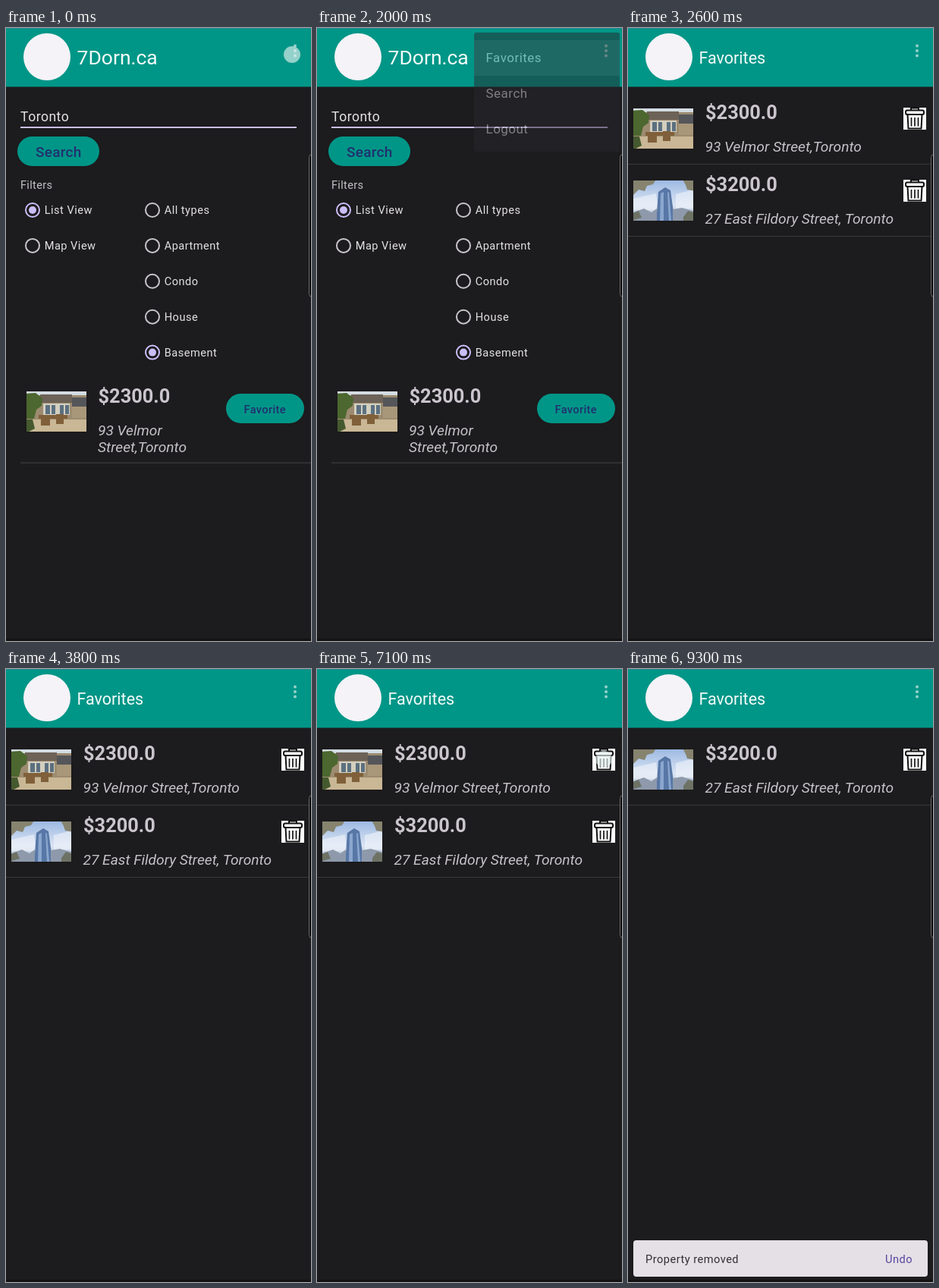
These frames come from a looping animation (402 by 808 pixels, 9800 ms). An HTML page:

```html
<!DOCTYPE html>
<html lang="en">
<head>
<meta charset="utf-8">
<title>Rental search</title>
<style>
  html, body { margin: 0; height: 100%; overflow: hidden; background: #1c1b1d; }
  svg { display: block; width: 402px; height: 808px; }
  text { font: 14.6px Roboto, sans-serif; letter-spacing: .48px; fill: #e4e1e5; }
  .brand { font-size: 26.5px; letter-spacing: 0; fill: #f4fbfa; }
  .title { font-size: 21.5px; letter-spacing: 0; fill: #f4fbfa; }
  .field { font-size: 17.6px; }
  .menu { font-size: 17px; }
  .price { font-size: 25.4px; font-weight: 700; letter-spacing: 0; fill: #cac5cd; }
  .address { font-size: 19.2px; font-style: italic; letter-spacing: 0; fill: #c6c2c8; }
  .button { font-weight: 500; letter-spacing: .35px; fill: #20306f; }
  .big { font-size: 19px; letter-spacing: .25px; }
  .radio { fill: none; stroke: #c9c5cb; stroke-width: 2; }
  .radio.on { stroke: #cbbef8; }
</style>
</head>
<body>
<svg viewBox="0 0 402 808">
  <defs>
    <linearGradient id="sky" x2="0" y2="1">
      <stop stop-color="#9db9e2"/><stop offset=".6" stop-color="#d9e4f3"/><stop offset="1" stop-color="#b4c1d4"/>
    </linearGradient>
    <filter id="soft"><feGaussianBlur stdDeviation=".7"/></filter>
    <clipPath id="photoClip"><path d="M0 0h79v53H0z"/></clipPath>
    <clipPath id="menuClip"><rect id="reveal"/></clipPath>

    <g id="house" clip-path="url(#photoClip)">
      <path fill="#9c8b70" d="M0 0h79v53H0z"/>
      <g filter="url(#soft)">
        <path fill="#d3dce2" d="M-3-3h85v8H-3z"/>
        <path fill="#6d6257" d="M18 4h42v11H18z"/>
        <path fill="#55565a" d="M60 8h22v13H60z"/>
        <path fill="#a89779" d="M60 20h22v15H60z"/>
        <path fill="#d3cfbf" d="M22 16h35v15H22z"/>
        <path fill="#5c7080" d="M25 18h6v12h-6zm8 0h5v12h-5zm11 0h5v12h-5zm7 0h5v12h-5z"/>
        <path fill="#c9b795" d="M-3 37h85v19H-3z"/>
        <path fill="#80603a" d="M16 31h38v5H16zm3 5h12v9H19zm20-6h10v13H39z"/>
        <path fill="#4c672f" d="M-3 3l15-1 9 7-1 10-7 5-3 12H-3z"/>
        <path fill="#45592f" d="M-3 37H8l3 12-14 7z"/>
      </g>
    </g>

    <g id="tower" clip-path="url(#photoClip)">
      <path fill="url(#sky)" d="M0 0h79v53H0z"/>
      <g filter="url(#soft)">
        <path fill="#f0f4fa" opacity=".6" d="M0 24l30-7 2 22H0zm56-6l23-6v25H56z"/>
        <path fill="#5877a6" d="M33 15l9-6 7 4 6 43H30z"/>
        <path fill="#8ba7cf" d="M36 17l4-2v38h-5zm9-2l2 1 3 37h-3z"/>
        <path fill="#8e9aab" d="M-3 43l17-6 10 5 7-5v19H-3zm55-5l12-2 18 5v15H52z"/>
        <path fill="#86846f" d="M-3-3h34l-5 8-8 2-3 7-8-2-7 7-3 1zm67 0h18v17l-11-2-2-6z"/>
        <path fill="#6d7264" d="M-3 44l10-4 4 9-14 4zm69 4l6-8 10 3v13H66z"/>
      </g>
    </g>

    <g id="trash">
      <path fill="#fff" d="M363 105h30v29h-30z"/>
      <g fill="#fff" stroke="#111" stroke-width="2">
        <path d="M373 109v-3.500h10v3.500M368.500 114l1 18.500h17l1-18.500z"/>
        <rect x="366" y="108.500" width="24" height="5.500" rx="2"/>
        <path d="M373.500 118v11.500M378 118v11.500M382.500 118v11.500" stroke-width="1.700"/>
      </g>
    </g>

    <g id="header">
      <path fill="#009687" d="M0 0h402v77.500H0z"/>
      <path fill="#2b8593" d="M0 0h402v1H0z"/>
      <circle cx="54" cy="38" r="31" fill="#f5f3f7"/>
      <g fill="#94d2ca">
        <circle cx="381" cy="23.500" r="2"/><circle cx="381" cy="30" r="2"/><circle cx="381" cy="36.500" r="2"/>
      </g>
    </g>
  </defs>

  <path fill="#1c1b1d" d="M0 0h402v808H0z"/>

  <g id="searchPage">
    <use href="#header"/>
    <text class="brand" x="93.500" y="48">7Dorn.ca</text>
    <text class="field" x="19" y="122.500">Toronto</text>
    <path id="caret" fill="#d3c8f5" d="M85.500 103h1.500v25h-1.500z"/>
    <path fill="#cbbdf0" d="M19 130h364v2H19z"/>
    <rect x="15" y="143" width="108" height="39" rx="19.500" fill="#009687"/>
    <text class="button big" x="39" y="170">Search</text>
    <text x="19" y="212" style="fill:#c5c1c7;letter-spacing:.3px">Filters</text>
    <g id="options"></g>
    <use href="#house" x="27" y="479"/>
    <text class="price" x="121.500" y="494">$2300.0</text>
    <text class="address" x="121" y="537">93 Velmor</text>
    <text class="address" x="121" y="559">Street,Toronto</text>
    <rect x="290" y="482" width="103" height="39" rx="19.500" fill="#009687"/>
    <text class="button" x="313.500" y="507.500">Favorite</text>
    <path fill="#3d3c3f" d="M19 572.500h383v1.200H19z"/>
  </g>

  <g id="menu" clip-path="url(#menuClip)">
    <rect x="207" y="6" width="192" height="157" rx="3" fill="#29282e"/>
    <path id="pressed" fill="#fff" opacity=".1" d="M207 16h192v47H207z"/>
    <text class="menu" x="222.500" y="45">Favorites</text>
    <text class="menu" x="222.500" y="92">Search</text>
    <text class="menu" x="222.500" y="139">Logout</text>
  </g>

  <g id="favoritesPage">
    <path fill="#cbbbfb" d="M0-30h402V0H0z"/>
    <path fill="#1c1b1d" d="M0 0h402v808H0z"/>
    <use href="#header"/>
    <text class="title" x="93.500" y="46.500">Favorites</text>
    <g id="first">
      <use href="#house" x="7" y="106"/>
      <text class="price" x="102" y="120">$2300.0</text>
      <text class="address" x="101.500" y="163">93 Velmor Street,Toronto</text>
      <use href="#trash"/>
      <path fill="#39383b" d="M0 179h402v1H0z"/>
    </g>
    <g id="second">
      <use href="#tower" x="7" y="106"/>
      <text class="price" x="102" y="120">$3200.0</text>
      <text class="address" x="101.500" y="163">27 East Fildory Street, Toronto</text>
      <use href="#trash"/>
      <path fill="#39383b" d="M0 179h402v1H0z"/>
    </g>
  </g>

  <g id="snackbar">
    <rect x="7" y="753" width="388" height="48" rx="4" fill="#e4e0e5"/>
    <text x="23" y="783" style="fill:#323034">Property removed</text>
    <text x="339" y="783" style="fill:#5646a0">Undo</text>
  </g>

  <circle id="touch" r="11" fill="#e3f1f0"/>
  <rect x="399.500" y="166.500" width="9" height="188" rx="4" fill="#0b0b0c" stroke="#6f6e70"/>
  <path fill="#141213" d="M0 805h402v3H0z"/>
</svg>

<script>
const LOOP = 9800, STEP = 100;
const el = id => document.getElementById(id);
const set = (id, attrs) => {
  for (const key in attrs) el(id).setAttribute(key, attrs[key]);
};
const fade = (id, opacity) => set(id, { opacity });
const progress = (t, start, end) => Math.min(1, Math.max(0, (t - start) / (end - start)));
const easeOut = p => 1 - (1 - p) ** 2;

const option = (x, row, label, on) => {
  const y = 240 + row * 46.9;
  const dot = on ? `<circle cx="${x}" cy="${y}" r="5" fill="#cbbef8"/>` : '';
  return `<circle class="radio ${on ? 'on' : ''}" cx="${x}" cy="${y}" r="9"/>${dot}
    <text x="${x + 15.7}" y="${y + 5.3}">${label}</text>`;
};
el('options').innerHTML =
  ['List View', 'Map View'].map((label, i) => option(35, i, label, i === 0)).join('') +
  ['All types', 'Apartment', 'Condo', 'House', 'Basement']
    .map((label, i) => option(193, i, label, i === 4)).join('');

const taps = [
  { from: 0, to: 100, x: 377, y: 35 },
  { from: 1800, to: 1900, x: 262, y: 40 },
  { from: 7100, to: 7200, x: 378, y: 119 }
];

function draw(t) {
  // Search page: blinking caret and overflow menu
  fade('caret', t >= 300 && t < 1800 && Math.floor((t - 300) / 500) % 2 === 0 ? 1 : 0);
  const open = easeOut(progress(t, 100, 500));
  set('reveal', { x: 399 - 192 * open, y: 6, width: 192 * open, height: 157 * open });
  fade('menu', progress(t, 100, 300) * (1 - progress(t, 1900, 2100)));
  fade('pressed', t >= 1800 ? .1 : 0);

  // Favorites page slides up while fading in
  const shift = t < 2600 ? 65 * Math.exp(-Math.max(0, t - 2100) / 111) : 0;
  set('favoritesPage', { transform: `translate(0 ${shift})` });
  fade('favoritesPage', progress(t, 2000, 2300));

  const loaded = t >= 2500, removed = t >= 7300;
  fade('first', loaded && !removed ? 1 : 0);
  fade('second', loaded ? 1 : 0);
  set('second', { transform: `translate(0 ${removed ? 0 : 95})` });

  // Snackbar pops in around its centre
  const pop = progress(t, 7260, 7410);
  const scale = .8 + .2 * easeOut(pop) - (pop > 0 && pop < 1 ? .015 : 0);
  set('snackbar', { transform: `translate(201 777) scale(${scale}) translate(-201 -777)` });
  fade('snackbar', pop);

  const tap = taps.find(({ from, to }) => t >= from && t <= to);
  if (tap) set('touch', { cx: tap.x, cy: tap.y });
  fade('touch', tap ? (t < tap.to ? .65 : .3) : 0);
}

function tick() {
  const t = performance.now() % LOOP;
  draw(Math.floor(t / STEP) * STEP);
  requestAnimationFrame(tick);
}
tick();
</script>
</body>
</html>
```
